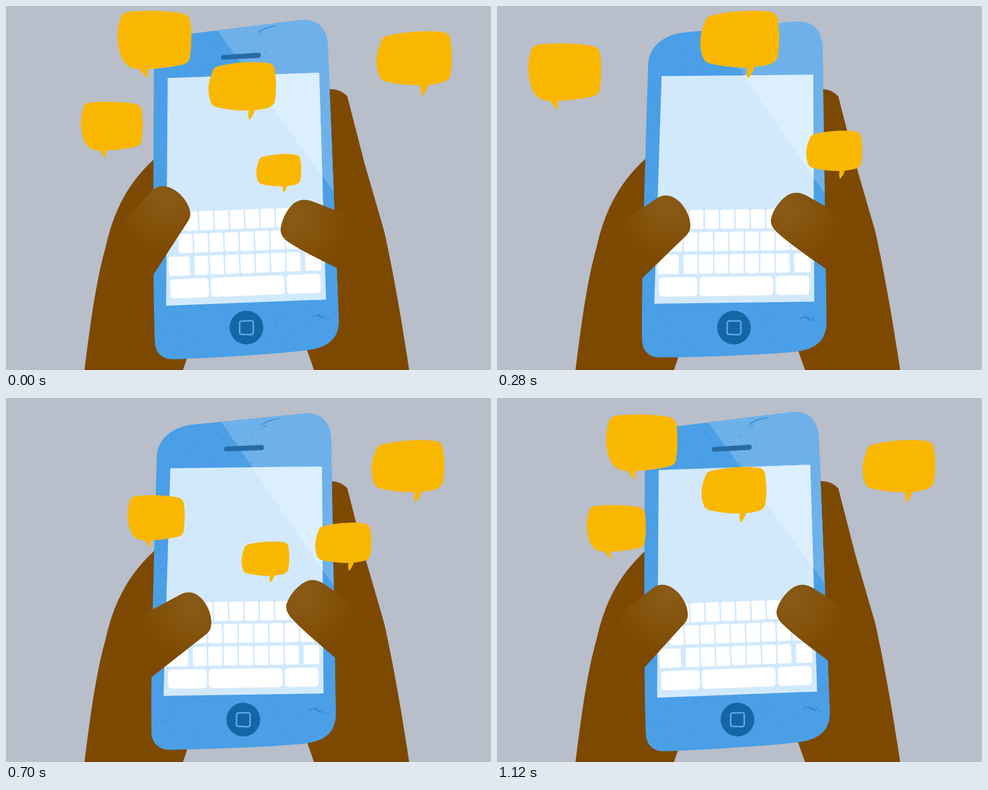
An HTML page that plays this animation: 800 px wide and 600 px high, repeating every 1190 ms.

```html
<!DOCTYPE html>
<html lang="en">
<head>
<meta charset="utf-8">
<title>Texting</title>
<style>
  html, body { margin: 0; width: 100%; height: 100%; overflow: hidden; background: #b8beca; }
  svg { display: block; width: 100vw; height: 100vh; }
  .hand { fill: #7d4900; }
  .key { fill: #fff; }
  .speck { fill: #2f86d0; }
  .scratch { fill: none; stroke: #2a7cc4; stroke-width: 1.3; stroke-linecap: round; opacity: .8; }
</style>
</head>
<body>
<svg viewBox="0 0 800 600">
  <defs>
    <clipPath id="body"><path d="M252,95 C253,66 278,47 308,43 L497,27 Q538,26 540,70 L541,520 C541,556 520,570 478,572 Q400,577 267,578 Q236,577 236,546 Q236,450 252,95Z"/></clipPath>
    <radialGradient id="leftSkin" gradientUnits="userSpaceOnUse" cx="264" cy="316" r="92">
      <stop offset="0" stop-color="#8a5c18"/><stop offset="1" stop-color="#7d4900"/>
    </radialGradient>
    <radialGradient id="rightSkin" gradientUnits="userSpaceOnUse" cx="476" cy="350" r="92">
      <stop offset="0" stop-color="#8a5c18"/><stop offset="1" stop-color="#7d4900"/>
    </radialGradient>
  </defs>
  <path class="hand" d="M129.500,600 C138,530 149,450 164.500,397 C179,332 205,287 249,248 L330,400 L298,582 L292,600Z"/>
  <path class="hand" d="M500,140 L536,137 Q552,137 563,149 L591,258 L624,372 Q645,467 665,600 L508,600 L494,560Z"/>

  <g id="phone">
    <g clip-path="url(#body)">
      <rect x="220" y="10" width="340" height="580" fill="#4a9fe6"/>
      <path d="M353,30 L541,312 L560,312 L560,0 L353,0Z" fill="#6eb1ea"/>
      <g id="specks"></g>
      <path class="scratch" d="M425,45 Q438,36 456,35 M497,517 Q503,511 510,517 T520,515 M506,513 L514,517 M522,520 L525,522"/>
    </g>
    <path d="M274,114 L524,115 L521,489 L257,489Z" fill="#d2e9fd"/>
    <path d="M409,114.500 L524,115 L522.600,286Z" fill="#dbefff"/>
    <path d="M367,79.500 L425,78 Q429,78 429,82 Q429,86 425,86.500 L367,87.500 Q363,87 363,83.500 Q363,80 367,79.500Z" fill="#276ba5"/>
    <circle cx="388" cy="530" r="27.800" fill="#1566a6"/>
    <path d="M381,519 L396,519 Q400,519 399.500,523 L399,538 Q399,542 395,542 L380,541 Q376,541 376.500,537 L377,523 Q377,519 381,519Z" fill="none" stroke="#5ba8e8" stroke-width="2.600"/>
    <g id="keys"></g>
  </g>

  <g id="bubbles"></g>
  <path id="leftThumb" fill="url(#leftSkin)" d="M190,359 L240,305 Q248,297 258,297 C281,297 304,324 304,343 Q304,349 300,355 L245,440 L230,463Z"/>
  <path id="rightThumb" fill="url(#rightSkin)" d="M565,345 L504,321.500 Q487,316 475,325 C461,337 453,357 453,371 Q454,380 463,387 Q480,400 546,432 L572,445Z"/>
</svg>
<script>
const STEP = 70, COUNT = 17, LIFE = 12;
const $ = id => document.getElementById(id);

function add(parent, tag, attrs) {
  const el = document.createElementNS('http://www.w3.org/2000/svg', tag);
  for (const name in attrs) el.setAttribute(name, attrs[name]);
  return parent.appendChild(el);
}

// Keyboard
function keys(count, x, y, width = 22.8, rx = 3) {
  for (let i = 0; i < count; i++) {
    add($('keys'), 'rect', { class: 'key', x: x + 25.3 * i, y, width, height: 31.5, rx });
  }
}
keys(10, 266.5, 335.5);
keys(9, 281.7, 372);
keys(1, 264, 409, 34.5);
keys(7, 306.5, 409);
keys(1, 489, 409, 26);
keys(1, 265, 446, 63.5, 6);
keys(1, 332, 446, 121.5, 6);
keys(1, 457.5, 446, 55.5, 6);

// Print texture on the casing
let seed = 11;
const random = () => (seed = seed * 16807 % 2147483647) / 2147483647;
function specks(n, x, y, w, h) {
  for (let i = 0; i < n; i++) {
    add($('specks'), 'ellipse', {
      class: 'speck', cx: x + random() * w, cy: y + random() * h,
      rx: 0.5 + random() * 1.3, ry: 0.5 + random(), opacity: 0.2 + random() * 0.5
    });
  }
}
specks(28, 255, 40, 190, 70);
specks(22, 243, 100, 26, 230);
specks(45, 240, 492, 300, 84);

// Speech bubbles grow while flying along a Bezier curve, then pale and vanish
const tailRight = 'M-57,-28 Q-55,-37 -46,-39 C-18,-46 22,-49 50,-45 Q61,-43 62,-31 Q67,0 62,28 Q59,38 48,41 Q36,44 24,45 Q21,56 13,64 Q10,54 12,46 Q-22,46 -50,39 Q-59,36 -61,27 Q-70,2 -57,-28Z';
const tailLeft = 'M-60,-38 Q-57,-48 -45,-49.500 Q5,-54 48,-47 Q61,-44 63,-32 Q67,0 62,32 Q60,40 50,43 Q20,50 -12,51 Q-14,59 -11,67 Q-20,62 -26,51 Q-44,51 -51,41 Q-57,35 -60,25 Q-70,-6 -60,-38Z';
const right = { shape: tailRight, size: 1, x: [450, 568, 654, 681.5], y: [271, 268.6, 167.6, 60] };
const top_ = { shape: tailRight, size: 1.01, x: [439, 392, 377.5, 400.5], y: [282.5, 214.5, 131.5, 55] };
const left = { shape: tailLeft, size: 1, x: [325, 221, 102, 103], y: [258, 255, 169, 54.5] };
const upperLeft = { shape: tailLeft, size: 0.94, x: [328, 232.5, 217, 245], y: [257, 247.5, 122.5, 56] };

const bubble = (born, flight) =>
  ({ born, flight, el: add($('bubbles'), 'path', { d: flight.shape }) });
const bubbles = [bubble(0, right), bubble(6, right), bubble(9, top_), bubble(11, left), bubble(5, upperLeft)];

const mix = (a, b, t) => a + (b - a) * t;
const bezier = ([a, b, c, d], t) =>
  a * (1 - t) ** 3 + 3 * b * t * (1 - t) ** 2 + 3 * c * t * t * (1 - t) + d * t ** 3;

function drawBubble({ born, flight, el }, step) {
  const age = (step - born + COUNT) % COUNT;
  const t = Math.min(age / LIFE, 1);
  el.setAttribute('visibility', age > LIFE + 1 ? 'hidden' : 'visible');
  el.setAttribute('fill', age > LIFE ? '#fcdb7f' : '#fab700');
  el.setAttribute('transform',
    `translate(${bezier(flight.x, t)} ${bezier(flight.y, t)}) scale(${mix(0.575, flight.size, t)})`);
}

// Each loop has three thumb strokes: steps 0-6, 6-12 and 12-17.
// A hop is the [dx, dy, angle] at the middle of its stroke.
const leftTap = [18, 17.5, 14.5];
const leftHops = [leftTap, [41, 26.5, 21.4], leftTap];
const rightTap = [23.5, -29, 22];
const rightHops = [rightTap, rightTap, [14, -17, 17]];
const rightReach = [-32, 22, -16];

function setPose(el, [dx, dy, angle], cx, cy) {
  el.setAttribute('transform', `translate(${dx} ${dy}) rotate(${angle} ${cx} ${cy})`);
}

function draw(step) {
  const stroke = Math.floor(step / 6);
  const w = (step % 6) / (stroke < 2 ? 6 : 5);
  const lift = 4 * w * (1 - w);
  const reach = Math.max(0, 1 - Math.abs(step - 6) / 6);
  const tilt = step < 6 ? 1 - step / 6 : (step - 6) / 10;

  setPose($('phone'), [0, 0, -2.2 * tilt], 392, 306);
  setPose($('leftThumb'), leftHops[stroke].map(v => v * lift), 262, 340);
  setPose($('rightThumb'), rightHops[stroke].map((v, i) => v * lift + rightReach[i] * reach), 497, 362);
  for (const b of bubbles) drawBubble(b, step);
}

let start;
function tick(now) {
  start ??= now;
  draw(Math.floor((now - start) / STEP) % COUNT);
  requestAnimationFrame(tick);
}
draw(0);
requestAnimationFrame(tick);
</script>
</body>
</html>
```
